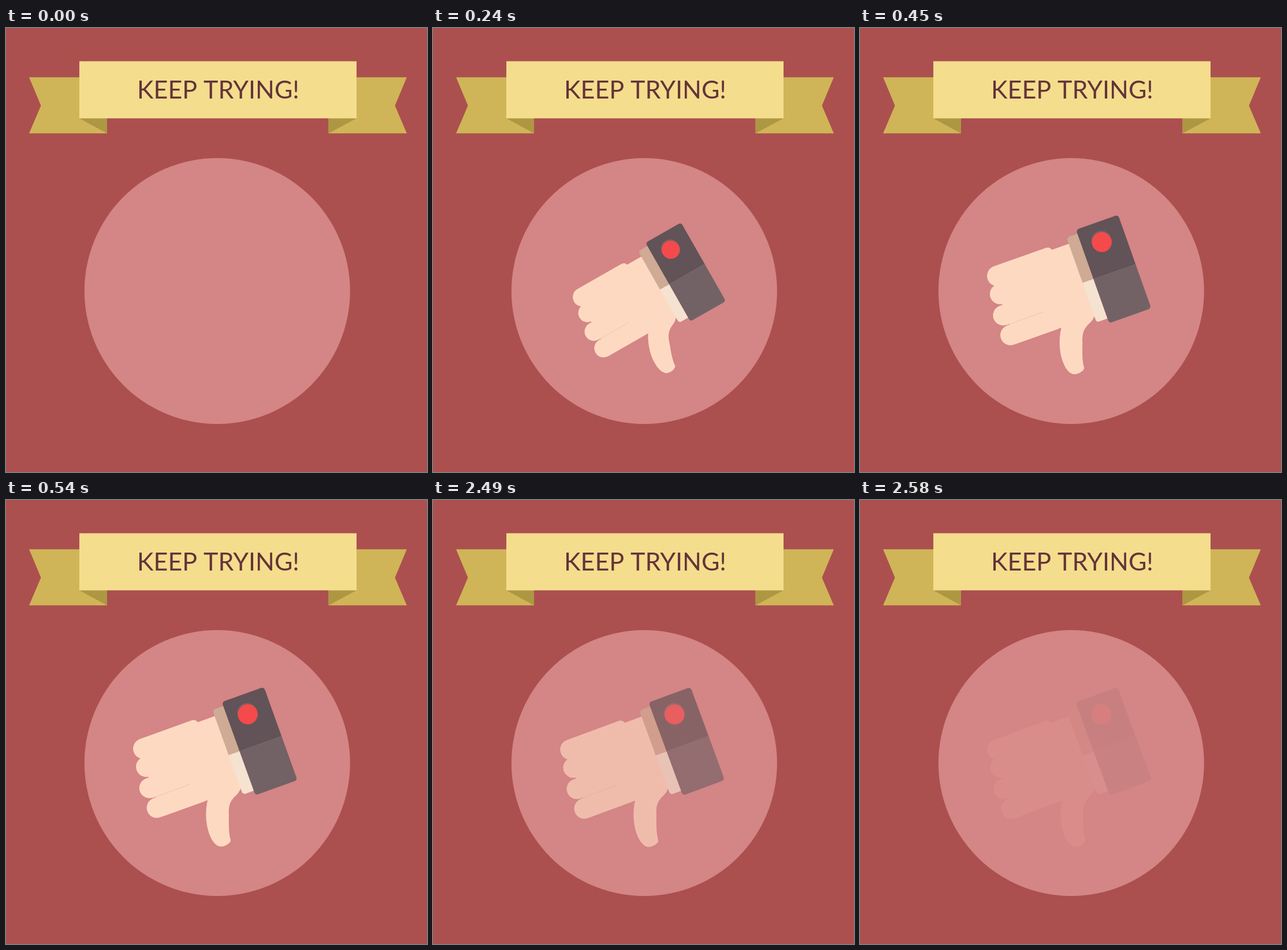
An HTML page with a canvas that plays this animation: 729x768 px, repeating every 2700 ms.

```html
<!DOCTYPE html>
<html lang="en">
<head>
<meta charset="utf-8">
<title>Keep trying</title>
<style>
html, body { margin: 0; width: 100%; height: 100%; overflow: hidden; background: #ab504f; }
canvas { position: absolute; left: 0; top: 0; width: 729px; height: 768px; }
</style>
</head>
<body>
<canvas id="scene" width="729" height="768"></canvas>
<canvas id="hand" width="729" height="768"></canvas>
<script>
const LOOP = 2700, STEP = 30;
const handLayer = document.getElementById('hand');
const scene = document.getElementById('scene').getContext('2d');
const hand = handLayer.getContext('2d');
const rad = deg => deg * Math.PI / 180;
const clamp = v => Math.min(1, Math.max(0, v));
const mix = (a, b, u) => a + (b - a) * u;
const smooth = u => (1 - Math.cos(Math.PI * clamp(u))) / 2;

function poly(c, color, ...pts) {
  c.fillStyle = color;
  c.beginPath();
  for (const [x, y] of pts) c.lineTo(x, y);
  c.fill();
}

function disc(c, color, x, y, r) {
  c.fillStyle = color;
  c.beginPath();
  c.arc(x, y, r, 0, 2 * Math.PI);
  c.fill();
}

function box(c, color, x0, y0, x1, y1, radius = 0) {
  c.fillStyle = color;
  c.beginPath();
  c.roundRect(x0, y0, x1 - x0, y1 - y0, radius);
  c.fill();
}

function tail(end, notch, inner, fold) {
  poly(scene, '#cfb557', [end, 85.3], [inner, 85.3], [inner, 182.3], [end, 182.3], [notch, 134.3]);
  poly(scene, '#ad9743', [fold, 156.3], [inner, 156.3], [inner, 182.3]);
}

function drawScene() {
  box(scene, '#ab504f', 0, 0, 729, 768);
  disc(scene, '#d48585', 365.8, 455, 230);
  tail(40, 60.5, 175, 127);
  tail(694, 673.5, 558.5, 607);
  box(scene, '#f4dd8d', 127, 57.5, 607, 156.3);
  scene.fillStyle = '#633339';
  scene.font = '43px Lato, sans-serif';
  scene.textAlign = 'center';
  scene.fillText('KEEP TRYING!', 367.5, 122);
}

// Hand in its own upright frame, centred on the sleeve
function drawHand(c) {
  const skin = '#fed9c1', split = 4.7;

  box(c, skin, -202, -67, -45, 65.5);
  box(c, skin, -211.5, -73.6, -89, -38.5, [17.5, 9, 9, 17.5]);
  for (const [x, y] of [[-217.4, -24.9], [-224.5, 11.7], [-224, 48.1]])
    box(c, skin, x, y - 17.5, -125, y + 17.5, [17.5, 0, 0, 17.5]);

  c.strokeStyle = '#e9c3ac';
  c.lineWidth = 0.8;
  c.beginPath();
  c.moveTo(-208, 29.7);
  c.lineTo(-139.8, 29.3);
  c.stroke();

  c.fillStyle = skin;
  c.beginPath();
  c.moveTo(-119, 65);
  c.bezierCurveTo(-131, 84, -138, 107, -136, 128);
  c.bezierCurveTo(-134.5, 140, -130, 149, -121, 149.8);
  c.bezierCurveTo(-114, 150.5, -104, 148, -105, 142);
  c.bezierCurveTo(-104, 130, -97, 112, -94, 104);
  c.bezierCurveTo(-89, 88, -85, 82, -74, 76);
  c.bezierCurveTo(-66, 73, -62, 70, -57, 64);
  c.lineTo(-57, 50);
  c.lineTo(-119, 50);
  c.fill();

  box(c, '#cfaa95', -58.6, -78.5, -36, split, [5, 0, 0, 0]);
  box(c, '#f5e2d0', -58.6, split, -36, 77.2, [0, 0, 0, 5]);
  box(c, '#615357', -38.6, -85.7, 38.8, split, [5, 5, 0, 0]);
  box(c, '#726265', -38.6, split, 38.8, 85.7, [0, 0, 5, 5]);
  disc(c, '#726265', -3.6, -53.3, 17.3);
  disc(c, '#f44a4c', -3.6, -50.7, 17.3);
}

function popScale(t) {
  if (t < 262) return (t - 90) / 150 * 0.914;
  return mix(1.037, 1, smooth((t - 262) / 90));
}

function swing(t) {
  if (t < 435) return mix(-9.5, 0.7, smooth((t - 305) / 130));
  return mix(0.7, 0, smooth((t - 435) / 225));
}

function fade(t) {
  return t < 2490 ? 1 : 0.66 - 0.187 * Math.min(3, (t - 2490) / STEP);
}

function about(c, x, y, change) {
  c.translate(x, y);
  change();
  c.translate(-x, -y);
}

function frame(now) {
  const t = Math.floor(now % LOOP / STEP) * STEP;
  hand.setTransform(1, 0, 0, 1, 0, 0);
  hand.clearRect(0, 0, 729, 768);
  if (t >= 120) {
    const k = popScale(t);
    about(hand, 400, 411, () => hand.scale(k, k));
    about(hand, 475, 409, () => hand.rotate(rad(swing(t))));
    hand.translate(439.15, 417.35);
    hand.rotate(rad(-20.2));
    drawHand(hand);
  }
  handLayer.style.opacity = fade(t);
}

drawScene();
let start;
function tick(now) {
  start ??= now;
  frame(now - start);
  requestAnimationFrame(tick);
}
requestAnimationFrame(tick);
</script>
</body>
</html>
```
